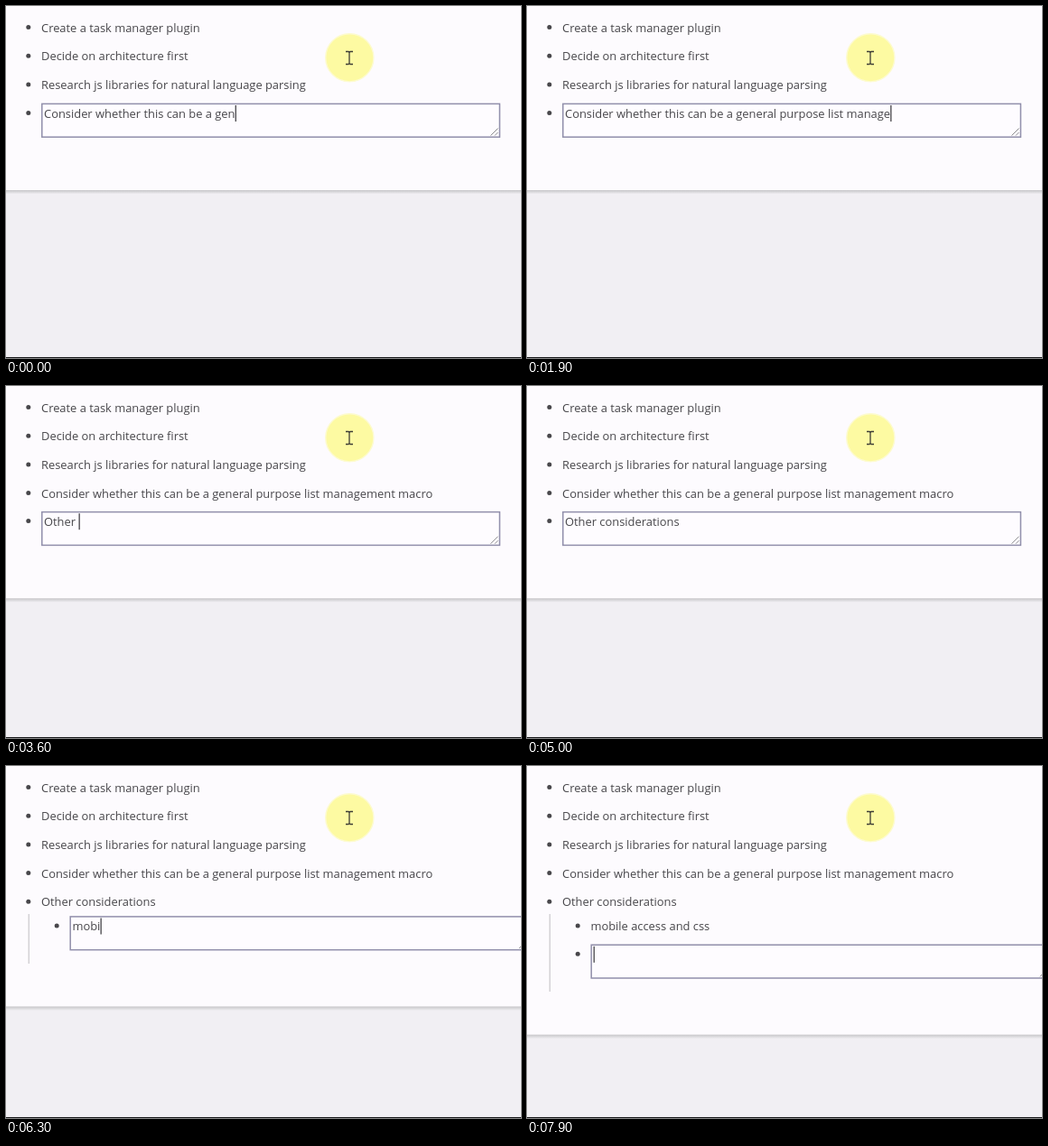
Animation, 570 px wide and 390 px high, one loop 8000 ms. Source, as an HTML page:

```html
<!DOCTYPE html>
<html lang="en">
<head>
<meta charset="utf-8">
<title>Task list</title>
<style>
  html, body { margin: 0; width: 100%; height: 100%; overflow: hidden; background: #f1eff3; }
  svg { display: block; }
  text { font: 12.9px "Open Sans", "Noto Sans", sans-serif; fill: #48474b; white-space: pre; }
</style>
</head>
<body>
<svg id="stage" width="570" height="390" viewBox="0 0 570 390">
  <defs>
    <linearGradient id="shade" x1="0" y1="0" x2="0" y2="1">
      <stop offset="0" stop-color="#c6c5c8"/>
      <stop offset=".35" stop-color="#d6d5d8"/>
      <stop offset="1" stop-color="#f1eff3"/>
    </linearGradient>
  </defs>
  <rect width="570" height="390" fill="#f1eff3"/>
  <rect id="sheet" width="570" fill="#fdfbfe"/>
  <rect id="edge" width="570" height="4.5" fill="url(#shade)"/>
  <rect y="389" width="570" height="1" fill="#19191b"/>
  <circle cx="380.3" cy="57.3" r="26.6" fill="#fdfaa2" stroke="#fdfbd0" stroke-width="1.4"/>
  <path d="M376 50.5h3l1 1 1-1h3M380 51v13M376 64.5h3l1-1 1 1h3" fill="none" stroke="#3f3e36" stroke-width="1.3"/>
  <path id="guide" fill="none" stroke="#d3d1d5" stroke-width="1.5"/>
  <g id="items"></g>
  <g id="field">
    <rect x=".8" y=".9" width="506.6" height="36.8" fill="#fefcff" stroke="#918fab" stroke-width="1.5"/>
    <path d="M497.5 36l8-8M502 36l3.5-3.5" stroke="#8b8a8e" fill="none"/>
    <text id="typed" x="3" y="16" xml:space="preserve"></text>
    <rect id="caret" y="2.5" width="1.2" height="18" fill="#37363a"/>
  </g>
</svg>
<script>
const LOOP = 8000, STEP = 100;
const $ = id => document.getElementById(id);
const NS = "http://www.w3.org/2000/svg";
const pen = document.createElement("canvas").getContext("2d");

const LINES = [
  "Create a task manager plugin",
  "Decide on architecture first",
  "Research js libraries for natural language parsing",
  "Consider whether this can be a general purpose list management macro",
  "Other considerations",
  "mobile access and css"
];

// [time, letters typed] for each line being edited
const TYPING = {
  3: [[0, 34], [900, 46], [1000, 47], [1100, 47], [1500, 53], [1600, 53], [1900, 58], [2500, 68]],
  4: [[2900, 0], [3600, 6], [4400, 18], [4600, 20]],
  5: [[5600, 0], [5700, 1], [5800, 1], [5900, 2], [6100, 2], [7000, 13], [7400, 21]]
};

// Edited row, field position and sheet height from each time on
const SCENES = [
  { at: 0, row: 3, x: 39, y: 107.5, sheet: 204 },
  { at: 2700, row: 4, x: 39, y: 138.7, sheet: 235.3 },
  { at: 5100, row: 5, x: 39, y: 170, sheet: 266.5 },
  { at: 5400, row: 5, x: 70.4, y: 166, sheet: 266.5, guide: 219 },
  { at: 7600, row: 6, x: 70.4, y: 197.3, sheet: 297.7, guide: 250 }
];

const nested = i => i > 4;
const rowY = i => nested(i) ? 177.2 + (i - 5) * 31.2 : 23.8 + i * 31.65;

function add(tag, attrs, parent) {
  const el = document.createElementNS(NS, tag);
  for (const k in attrs) el.setAttribute(k, attrs[k]);
  return parent.appendChild(el);
}

const rows = Array.from({ length: 7 }, (_, i) => {
  const g = add("g", {}, $("items"));
  const dot = add("circle", { r: 2.5, fill: "#48474b" }, g);
  const label = add("text", { x: nested(i) ? 70.4 : 39, y: rowY(i) + 4.8 }, g);
  label.textContent = LINES[i] || "";
  return { g, dot, label };
});

function lettersAt(keys, t) {
  if (!keys || t <= keys[0][0]) return keys ? keys[0][1] : 0;
  for (let i = 1; i < keys.length; i++) {
    const [t0, n0] = keys[i - 1], [t1, n1] = keys[i];
    if (t <= t1) return Math.round(n0 + (n1 - n0) * (t - t0) / (t1 - t0));
  }
  return keys[keys.length - 1][1];
}

function draw(time) {
  const t = Math.floor((time % LOOP) / STEP) * STEP;
  const s = SCENES.filter(c => c.at <= t).pop();

  rows.forEach(({ g, dot, label }, i) => {
    const active = i === s.row;
    g.style.display = i <= s.row ? "" : "none";
    label.style.display = active ? "none" : "";
    dot.setAttribute("cx", active ? s.x - 14.2 : nested(i) ? 56.2 : 24.8);
    dot.setAttribute("cy", active ? s.y + 10.9 : rowY(i) - 0.2);
  });

  $("sheet").setAttribute("height", s.sheet);
  $("edge").setAttribute("y", s.sheet);
  $("guide").setAttribute("d", s.guide ? `M25.3 164V${s.guide}` : "");
  $("field").setAttribute("transform", `translate(${s.x} ${s.y})`);

  const text = (LINES[s.row] || "").slice(0, lettersAt(TYPING[s.row], t));
  $("typed").textContent = text;
  pen.font = '12.9px "Open Sans", "Noto Sans", sans-serif';
  $("caret").setAttribute("x", 3.2 + pen.measureText(text).width);
  $("caret").style.display = t >= 4900 && t < 5100 ? "none" : "";
}

const start = performance.now();
function tick() {
  draw(performance.now() - start);
  requestAnimationFrame(tick);
}
tick();
</script>
</body>
</html>
```
